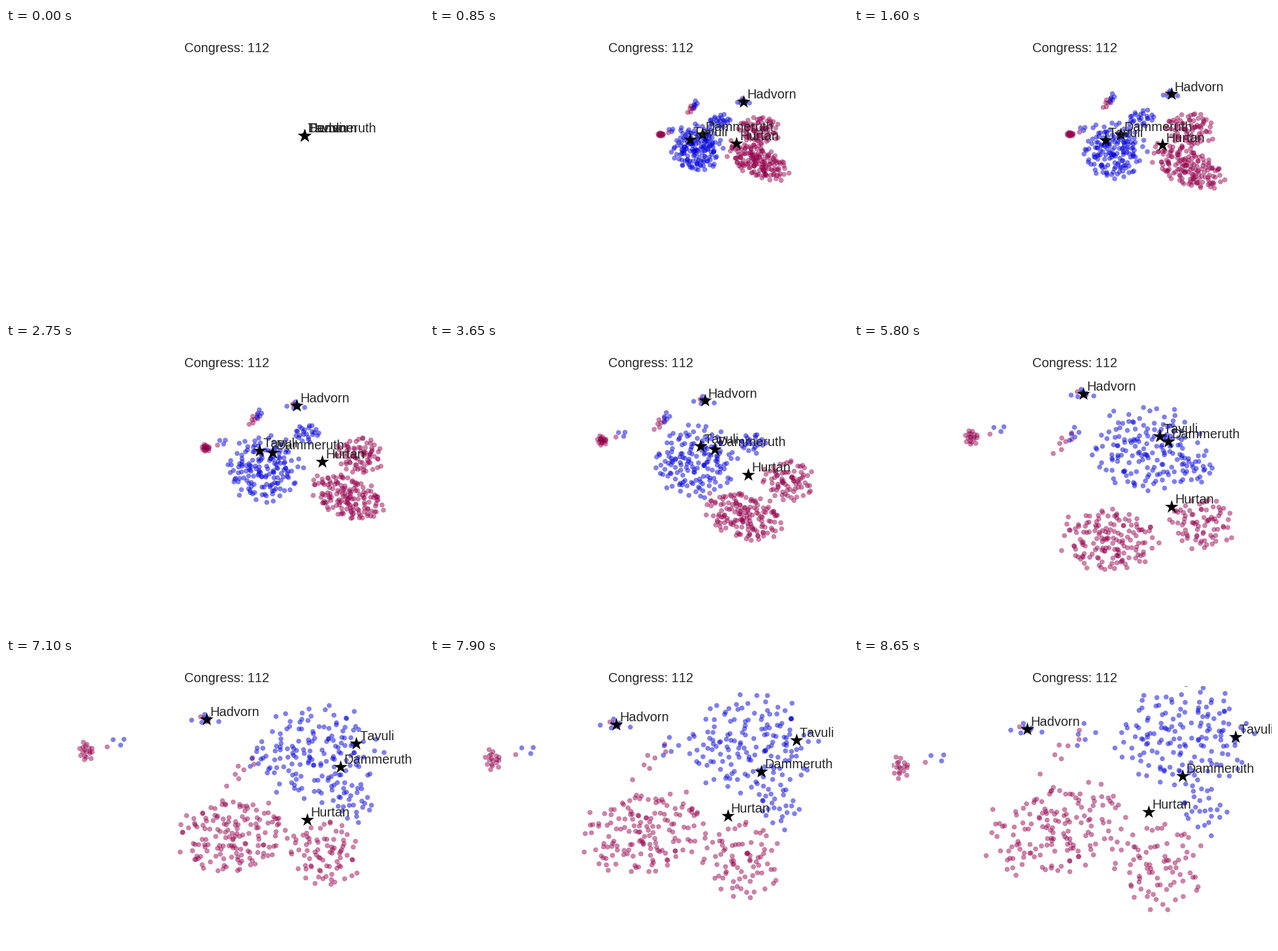
A matplotlib script for the animation above (8700 ms loop, 640x440 px).

```python
import numpy as np
import matplotlib.pyplot as plt
from matplotlib.animation import FuncAnimation

W, H, DPI = 640, 440, 100
STEP, FRAMES = 50, 174
PX = 72 / DPI                       # points per pixel
INK, BLUE, RED = "#262626", "#0000ff", "#ad005a"
BURST, FULL, END = 100, 1600, 8650  # start of motion, full burst, last frame
ORIGIN = np.array([457, 165])
TIMES = [FULL, 2750, 4550, 5800, 7100, END]

plt.rcParams["font.family"] = "Liberation Sans"
plt.rcParams["text.kerning_factor"] = 6
rng = np.random.default_rng(112)


class Path:
    """Point travelling through one place at each of TIMES."""

    def __init__(self, *points):
        self.xs, self.ys = zip(*points)

    def at(self, t):
        return np.array([np.interp(t, TIMES, self.xs),
                         np.interp(t, TIMES, self.ys)])


class Cloud:
    """Dots spread evenly in an ellipse that drifts, swells and tilts.

    The shift from the path is measured in radii of the ellipse.
    """

    def __init__(self, count, color, path, small, large,
                 ease=1, tilt=(0, 0), shift=(0, 0)):
        self.colors = [color] * count
        self.path, self.ease, self.tilt = path, ease, tilt
        self.small, self.large = np.array(small), np.array(large)
        self.shift = np.array(shift)
        i = np.arange(count) + .5
        r, a = (i / count) ** .58, i * np.pi * (3 - 5 ** .5)
        self.disc = np.column_stack([r * np.cos(a), r * np.sin(a)])
        self.disc += rng.normal(0, .1, (count, 2))
        self.phase = rng.uniform(0, 2 * np.pi, (count, 2))

    def at(self, t):
        u = np.clip((t - FULL) / (END - FULL), 0, 1)
        size = self.small + (self.large - self.small) * u ** self.ease
        k = self.tilt[0] + (self.tilt[1] - self.tilt[0]) * u
        x, y = (self.disc + .06 * np.sin(t / 700 + self.phase)).T
        tilted = np.column_stack([x, k * x + np.sqrt(1 - k * k) * y])
        return self.path.at(t) + size * (tilted + self.shift)


leaders = {
    "Hadvorn": Path((485.5, 101.5), (445, 96), (396, 81),
                    (351, 78), (307, 94), (265, 109)),
    "Tavuli": Path((385, 172), (388, 165), (440, 152),
                   (468, 143), (536, 131), (584, 121)),
    "Dammeruth": Path((408, 163), (408, 168), (463, 158),
                      (481, 151), (512, 167), (503, 181)),
    "Hurtan": Path((472, 179.5), (484, 182), (490, 221),
                   (486, 251), (461, 248), (451, 236)),
}

blue_main = Path((398, 188), (395, 193), (417, 170),
                 (448, 163), (477, 147), (505, 121))
blue_side = Path((440, 138), (460, 138), (526, 168),
                 (524, 192), (532, 222), (534, 232))
red_main = Path((512, 213), (523, 236), (438, 293),
                (392, 302), (347, 272), (310, 262))
red_side = Path((513, 155), (540, 172), (556, 249),
                (531, 276), (487, 299), (466, 318))
left = Path((331, 163), (306, 161), (221, 138),
            (180, 145), (123, 143), (71, 168))
bridge = Path((388, 114), (380, 116), (326, 128),
              (321, 151), (362, 170), (322, 138))
top = leaders["Hadvorn"]

clouds = [
    Cloud(155, BLUE, blue_main, (42, 42), (98, 77)),
    Cloud(24, BLUE, blue_side, (20, 14), (36, 40), ease=2, tilt=(-.2, 0)),
    Cloud(150, RED, red_main, (52, 34), (100, 72), ease=2, tilt=(.5, -.3)),
    Cloud(78, RED, red_side, (36, 27), (66, 66), ease=2),
    Cloud(18, RED, left, (5, 3), (13, 17)),
    Cloud(3, BLUE, left, (5, 7), (15, 14), shift=(3.8, -1.2)),
    Cloud(1, RED, left, (5, 7), (13, 14), shift=(2.6, -1.2)),
    Cloud(7, BLUE, top, (12, 6), (24, 9)),
    Cloud(2, RED, top, (8, 4), (16, 9)),
    Cloud(7, RED, bridge, (7, 10), (36, 40), ease=2, tilt=(-.6, -.9)),
    Cloud(5, BLUE, bridge, (6, 8), (26, 22), ease=2, shift=(1.2, -.8)),
]
colors = sum((c.colors for c in clouds), [])


def grow(points, t):
    """Burst out of the common starting point."""
    u = np.clip((t - BURST) / (FULL - BURST), 0, 1)
    return ORIGIN + (1 - (1 - u) ** 2.5) * (points - ORIGIN)


fig = plt.figure(figsize=(W / DPI, H / DPI), dpi=DPI, facecolor="white")
ax = fig.add_axes([58 / W, 43 / H, 560 / W, 354 / H])
ax.set_xlim(58, 618)
ax.set_ylim(397, 43)
ax.axis("off")

font = dict(fontsize=20 * PX, color=INK, va="baseline")
ax.text(338, 37, "Congress: 112", ha="center", **font)
start = np.tile(ORIGIN, (len(colors), 1))
dots = ax.scatter(*start.T, s=50 * PX ** 2, c=colors, alpha=.5,
                  edgecolors="black", linewidths=.3 * PX, zorder=2)
stars = ax.scatter(*start[:len(leaders)].T, s=(21.5 * PX) ** 2, c="black",
                   marker="*", linewidths=0, zorder=3)
labels = [ax.text(0, 0, name, zorder=4, **font) for name in leaders]


def draw(frame):
    t = frame * STEP
    dots.set_offsets(grow(np.vstack([c.at(t) for c in clouds]), t))
    places = grow(np.array([p.at(t) for p in leaders.values()]), t)
    stars.set_offsets(places)
    for label, (x, y) in zip(labels, places):
        label.set_position((x + 5, y - 5))
    return [dots, stars, *labels]


anim = FuncAnimation(fig, draw, frames=FRAMES, interval=STEP,
                     repeat=True, repeat_delay=0)
plt.show()
```
